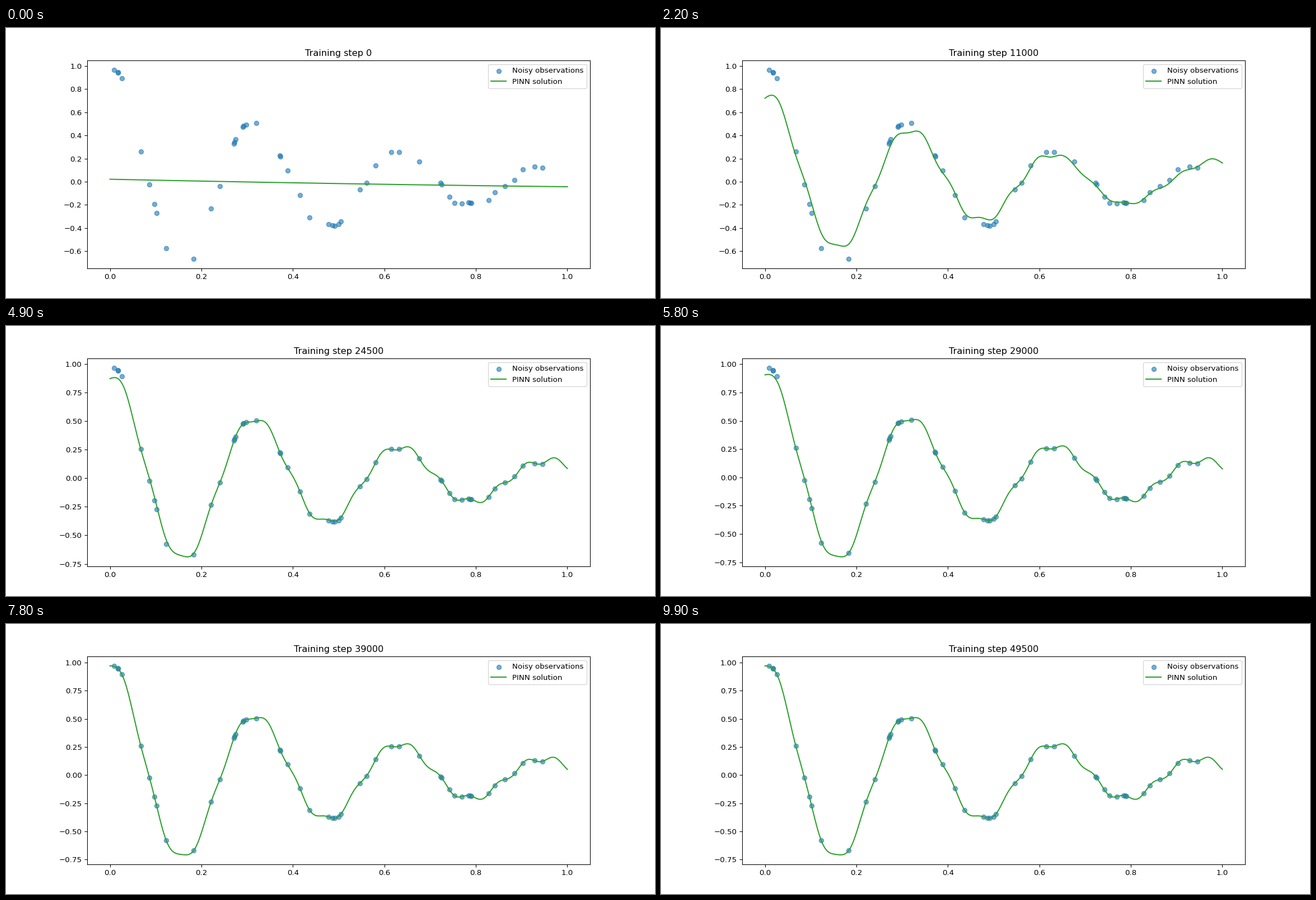
A matplotlib script for the animation above (10 s loop, 1159x483 px).

```python
import numpy as np
import matplotlib.pyplot as plt
from matplotlib.animation import FuncAnimation

plt.rcParams["font.family"] = "DejaVu Sans"

FRAMES, INTERVAL = 100, 100
STEPS_PER_FRAME = 500
DAMPING, NATURAL = 2, 20

# sampling times in units of 1e-4
obs_t = np.array([
    83, 169, 179, 261, 674, 865, 971, 1018, 1228, 1833, 2212, 2401, 2710,
    2722, 2743, 2900, 2922, 2982, 3194, 3717, 3726, 3880, 4153, 4365, 4780,
    4865, 4908, 4994, 5049, 5465, 5606, 5808, 6151, 6316, 6768, 7229, 7253,
    7418, 7535, 7688, 7844, 7878, 7902, 8281, 8410, 8637, 8849, 9025, 9286,
    9452]) / 1e4


def oscillator(t):
    """Underdamped oscillator released from rest at 1."""
    w = np.sqrt(NATURAL**2 - DAMPING**2)
    return np.exp(-DAMPING * t) * (np.cos(w * t) + DAMPING / w * np.sin(w * t))


def ripple(t):
    return -.003 - .027 * np.cos(100 * t + .1)


def bump(t, centre, width):
    return np.exp(-((t - centre) / width) ** 2)


def fade(t, edge, width):
    """Smooth step from 1 down to 0 around the edge."""
    return 1 / (1 + np.exp((t - edge) / width))


def fit(t, loss=0, early_loss=0, reach=1, lag=0, tail=0):
    """Partly trained curve: too flat, late at the start, too high at the end."""
    scale = 1 - loss - early_loss * np.exp(-(t / reach) ** 4)
    shape = oscillator(t - lag * np.exp(-t / .06))
    return scale * shape + tail * bump(t, 1, .045)


t = np.linspace(0, 1, 500)
start = .021 - .085 * t + .02 * t**2

# the first rough fit has not picked up the ripple on the right yet
left = fade(t, .64, .01)
rough = (fit(t, .19, .10, .27, .01, .165) + left * ripple(t)
         - (1 - left) * (.025 + .037 * bump(t, .89, .035)))

# (frame, curve, easing power towards the next stage)
STAGES = [
    (13, rough, 1),
    (32, fit(t, .08, .10, .20, .006, .07) + ripple(t), .7),
    (49, fit(t, .01, .085, .15, .004, .035) + ripple(t), 1),
    (68, fit(t, -.012, .04, .05, 0, .012) + ripple(t), 1),
    (78, fit(t) + ripple(t), 1),
]


def curve(frame):
    if frame == 0:
        return start
    if frame < STAGES[0][0]:
        # the fit spreads from left to right while its amplitude grows
        front = fade(t, .11 * frame, .06)
        return start * (1 - front) + rough * front * (1 - .5 * np.exp(-frame / 3.2))
    for (f0, y0, power), (f1, y1, _) in zip(STAGES, STAGES[1:]):
        if frame < f1:
            return y0 + (y1 - y0) * ((frame - f0) / (f1 - f0)) ** power
    return STAGES[-1][1]


obs_y = oscillator(obs_t) + ripple(obs_t)

# 12 x 5 inches at this dpi gives 1159 x 483 pixels
fig, ax = plt.subplots(figsize=(12, 5), dpi=96.601)
ax.scatter(obs_t, obs_y, color="tab:blue", alpha=.6, label="Noisy observations")
line, = ax.plot(t, start, color="tab:green", label="PINN solution")
title = ax.set_title("")
ax.set_xlim(-.05, 1.05)
ax.legend(loc="upper right")


def update(frame):
    y = curve(frame)
    line.set_ydata(y)
    low, high = min(y.min(), obs_y.min()), max(y.max(), obs_y.max())
    pad = .05 * (high - low)
    ax.set_ylim(low - pad, high + pad)
    title.set_text(f"Training step {frame * STEPS_PER_FRAME}")
    return line, title


anim = FuncAnimation(fig, update, frames=FRAMES, interval=INTERVAL,
                     init_func=lambda: update(0), repeat=True)
plt.show()
```
